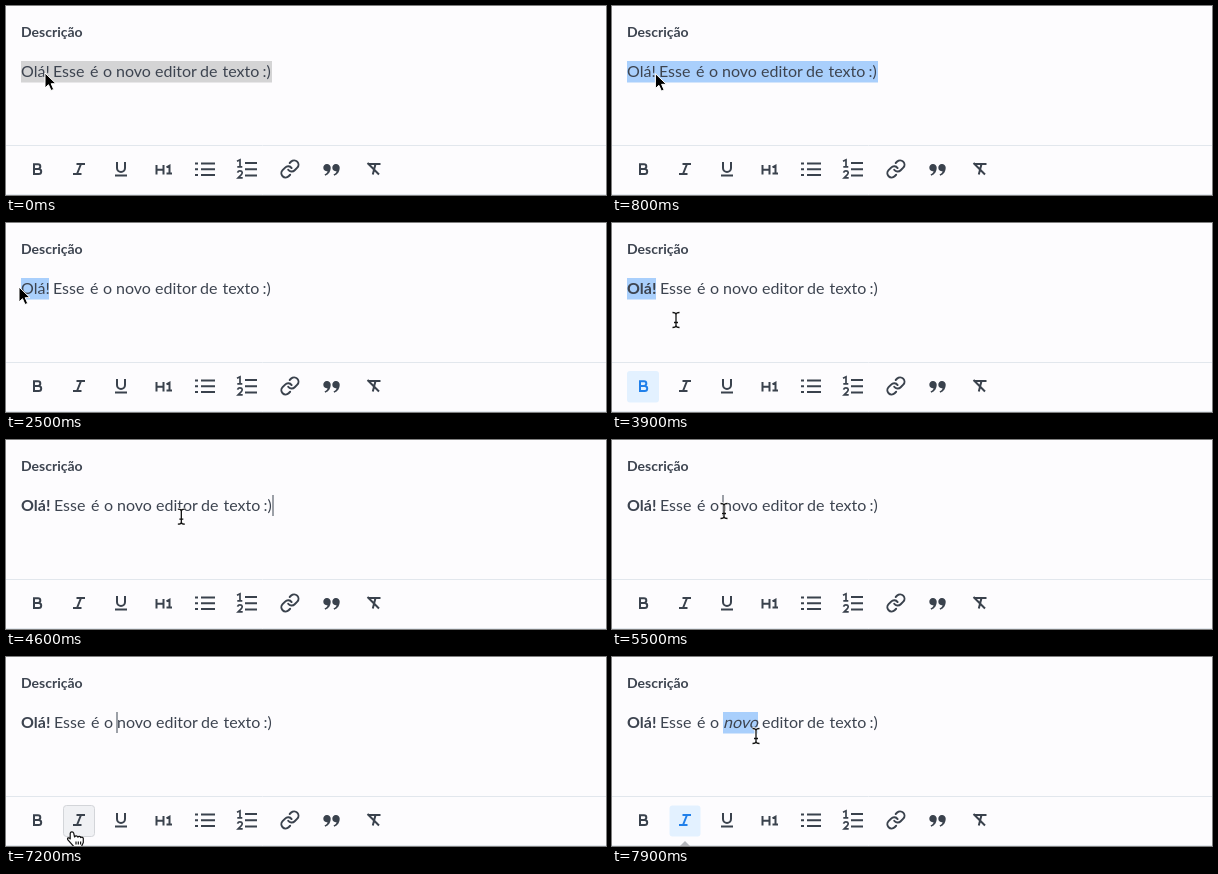
An HTML page that plays this animation: 600x189 px, repeating every 8000 ms.

```html
<!DOCTYPE html>
<html lang="pt">
<head>
<meta charset="utf-8">
<style>
  html, body { margin: 0; width: 100%; height: 100%; overflow: hidden; background: #fdfcfe; }
  svg { display: block; width: 600px; height: 189px; }
  text { font: 16px Lato, sans-serif; fill: #3d4450; }
  .strong { font-weight: 700; }
  .icon { fill: none; stroke: #3a424d; stroke-width: 2; }
  .button rect { fill: none; stroke: none; }
  .button.hover rect { fill: #f0f1f4; stroke: #d3d5d9; }
  .button.on rect { fill: #e3f1ff; stroke: none; }
  .button.on .icon { stroke: #2180ea; }
</style>
</head>
<body>
<svg viewBox="0 0 600 189">
  <text class="strong" x="15" y="31" style="font-size:14px">Descrição</text>
  <rect id="selection" y="55" height="21.5"/>
  <g id="words"></g>
  <rect id="caret" y="55" width="1" height="21" fill="#3d4450"/>
  <path d="M0 139.5H600M0 188.5H600" stroke="#e2e7ed"/>

  <g class="button" id="bold">
    <rect x="15" y="148" width="32" height="31.5" rx="3"/>
    <path class="icon" stroke-width="2.2" d="M28 158.3h4a2.3 2.3 0 0 1 0 4.6H28zM28 162.9h4.7a2.5 2.5 0 0 1 0 5H28z"/>
  </g>
  <g class="button" id="italic">
    <rect x="57.5" y="148.5" width="31" height="31" rx="3"/>
    <path class="icon" d="M70.5 158h8.5M67 168h8.5M75 158l-4 10"/>
  </g>
  <g class="icon">
    <path d="M111 156v6a4 4 0 0 0 8 0v-6M109 169.5h12"/>
    <path d="M150.5 159v9.5M157.5 159v9.5M150.5 163.7h7M160.5 161.3l3-1.6v8.8M160.5 167.6h5.5"/>
    <path d="M195 157.5h14M195 163.2h14M195 169h14M189 157.5h3M189 163.2h3M189 169h3"/>
    <path d="M239 157h12M239 163.2h12M239 169.5h12"/>
    <path stroke-width="1.7" d="M231 155.3l3-1.5v7M231.3 160.8h5M231.5 166.6q.7-1.7 2.4-1.7c3 0 2.8 2.6 1 4.2l-2.8 2.8h4.6"/>
    <g transform="translate(273.6 152.6) scale(.86)" stroke-width="2.3" stroke-linecap="round">
      <path d="M10 13a5 5 0 0 0 7.54.54l3-3a5 5 0 0 0-7.07-7.07l-1.72 1.71"/>
      <path d="M14 11a5 5 0 0 0-7.54-.54l-3 3a5 5 0 0 0 7.07 7.07l1.71-1.71"/>
    </g>
    <path d="M363 158h11.5M369.5 158l-2.7 10.5M361.5 157l11.5 11.5"/>
  </g>
  <g fill="#3a424d">
    <path id="quote" d="M318.5 168.5c2-.8 2.9-1.8 3-3.2a3.7 3.7 0 1 1 3.2-3.7c0 4-2 7-5.3 8.1z"/>
    <use href="#quote" x="9"/>
  </g>

  <path id="tip" fill="#b5b7bc" d="M-5 189l5-5 5 5z"/>
  <g id="cursor">
    <path id="arrow" fill="#000" stroke="#fff" stroke-linejoin="round" d="M0 0v15l3.5-3.3 2.5 5.8 2.7-1.1-2.5-5.7h4.8z"/>
    <g id="beam" fill="none">
      <path id="stem" stroke="#fff" stroke-width="3" d="M-3.5-7.5q3.5 0 3.5 2v11q0 2-3.5 2M3.5-7.5Q0-7.5 0-5.5M0 5.5q0 2 3.5 2M-2 2.5h4"/>
      <path stroke="#111" stroke-width="1.3" d="M-3.5-7.5q3.5 0 3.5 2v11q0 2-3.5 2M3.5-7.5Q0-7.5 0-5.5M0 5.5q0 2 3.5 2M-2 2.5h4"/>
    </g>
    <path id="hand" fill="#fff" stroke="#111" stroke-width="1.2" stroke-linejoin="round"
      d="M-1.8 7V1.4a1.8 1.8 0 0 1 3.5-.3L2.6 5a1.7 1.7 0 0 1 3.2.1 1.6 1.6 0 0 1 2.9.6 1.5 1.5 0 0 1 2.6 1.2v3.6l-1.5 3.2v2.3H1.5v-1.8l-5.6-6.3c-1.2-2 .9-2.9 2.3-1.2zM4 9.5v3M6.3 9.5v3M8.6 9.5v3"/>
  </g>
</svg>
<script>
const $ = id => document.getElementById(id);
const show = (el, on) => el.style.display = on ? '' : 'none';

const words = [['Olá!', 15], ['Esse', 47], ['é', 84], ['o', 97], ['novo', 110],
  ['editor', 149], ['de', 194], ['texto', 216.5], [':)', 256.5]].map(([label, x]) => {
  const el = document.createElementNS('http://www.w3.org/2000/svg', 'text');
  el.textContent = label;
  $('words').append(el);
  return { el, x };
});

// Pointer path: time, x, y
const path = [
  [0, 39, 67], [400, 41, 70], [900, 44, 67], [1500, 44, 67], [2000, 30, 70], [2400, 13, 64],
  [2800, 13, 64], [3300, 27, 171], [3500, 28, 174], [3700, 29, 172], [3800, 45, 134],
  [3900, 64, 97], [4200, 225, 74], [4400, 225, 74], [5000, 76, 82], [5300, 111, 71],
  [5500, 112, 71], [5800, 118, 71], [5900, 118, 71], [6300, 144, 71], [6500, 145, 71],
  [6600, 145, 71], [7100, 68, 176], [7200, 66, 175], [7500, 66, 175], [7600, 74, 162],
  [7700, 100, 125], [7800, 131, 94], [7900, 144, 79], [8000, 144, 79]
];

function pointer(t) {
  const i = path.findIndex(p => p[0] > t);
  const [t0, x0, y0] = path[i - 1], [t1, x1, y1] = path[i];
  const k = (t - t0) / (t1 - t0);
  return [x0 + (x1 - x0) * k, y0 + (y1 - y0) * k];
}

const snap = (x, edges) => edges.reduce((a, b) => Math.abs(b - x) < Math.abs(a - x) ? b : a);

function selected(t, x, bold) {
  if (t < 1400) return [15, 266];
  if (t < 1600) return [43, 43];
  if (t < 4300) return [t < 2400 ? snap(x, [15, 28, 32, 40, 43]) : 15, bold ? 44 : 43];
  if (t < 5400) return [267, 267];
  return [111, t < 5600 ? 111 : snap(x, [111, 121, 130, 138, 146])];
}

function draw(t) {
  const [x, y] = pointer(t);
  const bold = t >= 3500, italic = t >= 7500;
  const hand = y > 148, arrow = !hand && t < 3300;

  words.forEach((w, i) => {
    const left = w.x + (bold && i ? 1 : 0);
    w.el.setAttribute('transform', `translate(${left} 71.3)` + (italic && i === 4 ? 'skewX(-14)' : ''));
  });
  words[0].el.classList.toggle('strong', bold);

  const [a, b] = selected(t, x, bold);
  $('selection').setAttribute('x', a);
  $('selection').setAttribute('width', b - a);
  $('selection').setAttribute('fill', t < 800 ? '#d4d4d5' : '#a9cffc');
  $('caret').setAttribute('x', a - .5);
  show($('caret'), a === b && (t < 4300 || t >= 5400 || (t - 4300) % 1000 < 500));

  $('bold').classList.toggle('on', bold && t < 4300);
  $('bold').classList.toggle('hover', hand && x < 50);
  $('italic').classList.toggle('on', italic);
  $('italic').classList.toggle('hover', hand && x > 50);

  $('tip').setAttribute('transform', `translate(${t < 4000 ? 31 : 73})`);
  show($('tip'), t >= 3600 && t < 3900 || t >= 7600);

  $('cursor').setAttribute('transform', `translate(${x} ${y})`);
  show($('hand'), hand);
  show($('arrow'), arrow);
  show($('beam'), !hand && !arrow);
}

function tick() {
  draw(Math.floor(performance.now() % 8000 / 100) * 100);
  requestAnimationFrame(tick);
}
tick();
</script>
</body>
</html>
```
